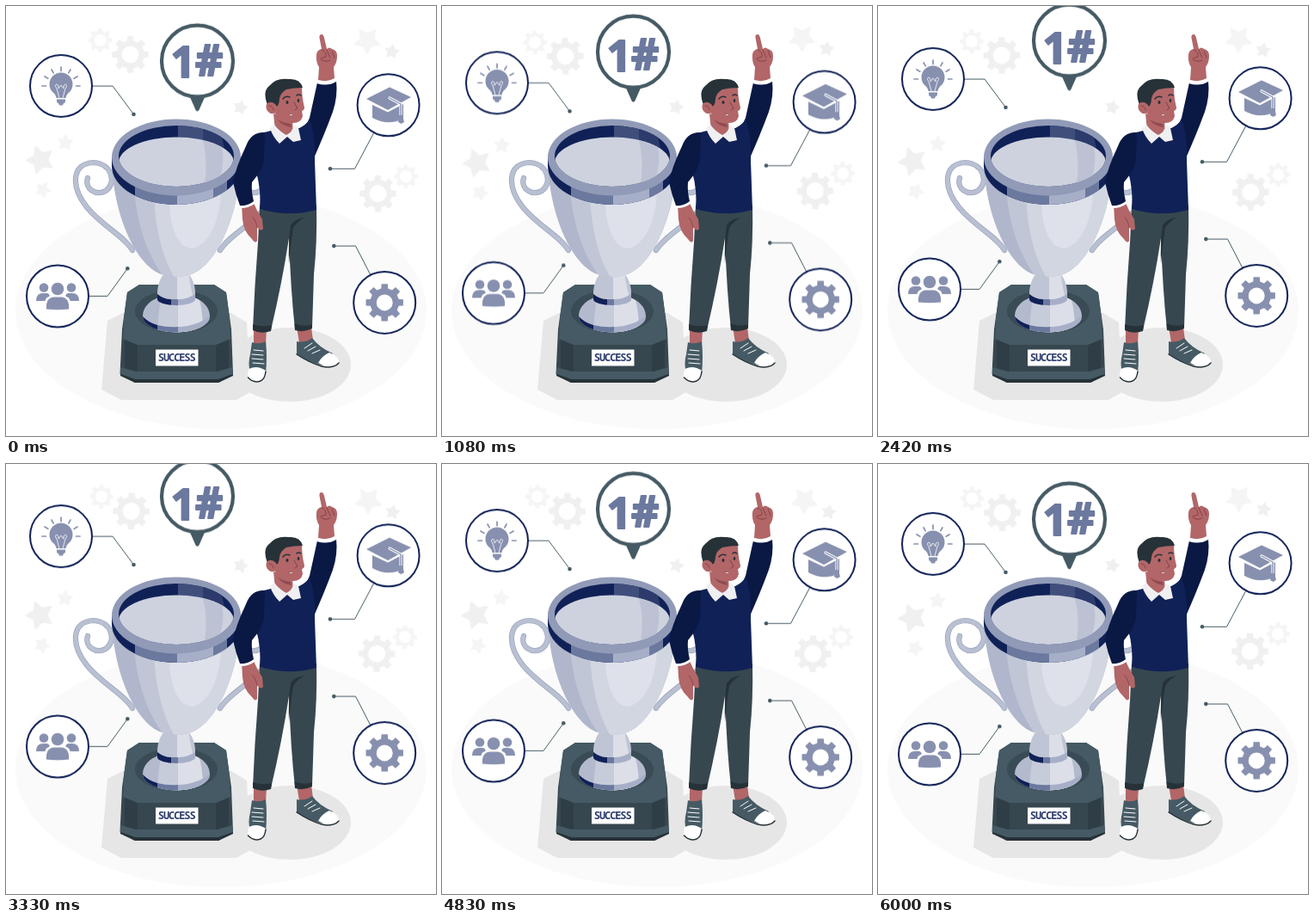
Recreate the animation shown at these times as an HTML page. Size 500 by 500 pixels, loop 6.04 s.

```html
<!DOCTYPE html>
<html lang="en">
<head>
<meta charset="utf-8">
<title>Success</title>
<style>
html, body { margin: 0; width: 100%; height: 100%; overflow: hidden; background: #fff; }
svg { display: block; width: 100vw; height: 100vh; }
.navy { fill: #102157; }
.deep { fill: #0a1844; }
.skin { fill: #b26668; }
.dark { fill: #263238; }
.slate { fill: #37474f; }
.steel { fill: #455a64; }
.icon { fill: #8790af; }
.ring { fill: #fff; stroke: #102157; stroke-width: 2; }
.lead { fill: none; stroke: #455a64; stroke-width: 1; }
.line { fill: none; stroke-linecap: round; stroke-linejoin: round; }
#scenery { transform-origin: 252px 132px; }
#near { fill: #f0f0f0; stroke: #f0f0f0; }
#far { fill: #f5f5f5; stroke: #f5f5f5; }
</style>
</head>
<body>
<svg viewBox="0 0 500 500">
  <defs>
    <clipPath id="cup"><path d="M123 178C124 242 151 302 181 312Q198 318 215 312C245 302 272 242 273 178Z"/></clipPath>
    <clipPath id="band"><path d="M123 176V186A75 45 0 0 0 273 186V176Z"/></clipPath>
    <clipPath id="inside"><ellipse cx="198" cy="174.5" rx="67" ry="35.5"/></clipPath>
    <clipPath id="foot"><path d="M159 361C159 350 167 343 177 339H219C229 343 237 350 237 361A39 18.5 0 0 1 159 361Z"/></clipPath>
    <clipPath id="stem"><path d="M184 311H212C218 318 220 327 220 334V341A22 7 0 0 1 176 341V334C176 327 178 318 184 311Z"/></clipPath>
    <path id="curl" class="line" d="M147 284C138 268 112 256 94 234C75 210 76 183 102 182C123 183 129 206 116 215C105 221 91 213 95 200"/>
  </defs>

  <ellipse cx="250" cy="354.4" rx="239" ry="137.8" fill="#fafafa"/>
  <g id="scenery"><g id="far"></g><g id="near"></g></g>

  <g fill="#e6e6e6">
    <path d="M118 366L136 357H262L280 368L284 449L268 458H134L111 446Z"/>
    <ellipse cx="330" cy="417" rx="71" ry="43"/>
  </g>

  <!-- trophy -->
  <g>
    <path class="slate" d="M141 333L155 324H242L256 333L262 376L264 428L247 438H150L132.500 428L135 376Z"/>
    <path class="steel" d="M155 324H242L256 333L260 364L243 391H154L137 364L141 333Z"/>
    <ellipse cx="198" cy="355" rx="48" ry="25" fill="#394b54"/>
    <path class="steel" d="M137 364L136 387L153 395H244L261 387L260 364L243 388H154Z"/>
    <path class="slate" d="M153 394H244L247 426H150Z"/>
    <path d="M138 388L153 394V425H138ZM259 388L244 394V425H259Z" fill="#2f3e46"/>
    <path class="steel" d="M133 420L151 425H246L263 420L264 428L247 434H150L133 428Z"/>
    <path class="dark" d="M133 428L150 434H247L264 428V430L247 438H150L133 430Z"/>
    <rect x="174" y="399.500" width="49.500" height="19" fill="#fff"/>
    <text x="198.200" y="413.300" text-anchor="middle" font-family="'Noto Sans Mono', monospace" font-weight="800" font-size="12" letter-spacing="-1.1" fill="#2b3a6b">SUCCESS</text>

    <g clip-path="url(#foot)">
      <rect x="155" y="335" width="90" height="50" fill="#b4bace"/>
      <path d="M181 335H220V390H176Q176 360 181 335Z" fill="#c7ccda"/>
      <path d="M200 335H222Q230 350 229 390H200Z" fill="#dcdfe8"/>
      <path class="navy" d="M155 356Q163 368 176 371V385H155Z"/>
      <path d="M176 371Q188 374 200 373V385H176Z" fill="#6c799f"/>
      <path d="M200 373Q226 372 240 357V385H200Z" fill="#a7afc8"/>
    </g>
    <g clip-path="url(#stem)">
      <rect x="170" y="305" width="60" height="50" fill="#c0c5d5"/>
      <path d="M199 305H212Q213 325 221 350H199Z" fill="#dcdfe8"/>
      <path class="navy" d="M170 329Q180 341 192 341V352H170Z"/>
      <path d="M192 341H200V352H192Z" fill="#6c799f"/>
      <path d="M200 341Q216 341 226 329V352H200Z" fill="#a7afc8"/>
    </g>

    <g id="handles"></g>

    <g clip-path="url(#cup)">
      <rect x="120" y="170" width="156" height="150" fill="#b0b6cb"/>
      <path d="M149 210C151 252 165 295 188 320H275V190Z" fill="#c1c6d6"/>
      <path d="M172 210C172 260 184 300 199 320H250L280 190Z" fill="#d2d6e1"/>
      <path d="M190 220C189 252 198 281 216 282C237 278 249 248 250 215Z" fill="#dee1ea"/>
    </g>
    <g clip-path="url(#band)" id="stripes"></g>
    <ellipse cx="198" cy="176" rx="75" ry="44.500" fill="#919bb8"/>
    <g clip-path="url(#inside)">
      <rect class="navy" x="130" y="135" width="136" height="80"/>
      <path d="M200 135H229V170H200Z" fill="#404e7c"/>
      <path d="M229 135H247L256 175H229Z" fill="#2c3b6c"/>
      <ellipse cx="198" cy="182" rx="67" ry="29.500" fill="#ced2df"/>
      <path d="M229 156L251 164Q255 182 248 201L231 206Q235 180 229 156Z" fill="#bcc2d3"/>
    </g>
  </g>

  <!-- man -->
  <g>
    <path class="skin" d="M288 375H303L302 394H288ZM338 373H355L357 389L341 392Z"/>
    <path class="steel" d="M286 391Q294 394 302 390Q304 408 302 427L284 426Q281 416 284 405Z"/>
    <path d="M282.500 422Q292 417 302 424Q302 434 297 436Q288 439 282 434Q280 428 282.500 422Z" fill="#fff"/>
    <path class="line" d="M281.500 432Q288 439 296 436Q301 434 302 425" stroke="#263238" stroke-width="1.500"/>
    <path class="steel" d="M338 390Q348 392 356 386Q364 397 380 404L368 418Q352 415 338 405Z"/>
    <path d="M363 415Q367 407 376 403Q388 408 387 415Q384 421 371 419Z" fill="#fff"/>
    <path class="line" d="M338 405Q353 415 367 419Q381 422 387 415" stroke="#263238" stroke-width="1.500"/>
    <path class="line" d="M288 400L299 401M286 405L299 406M286 410L299 411M287 415L300 416M347 398L356 392M351 401L360 396M356 404L365 400" stroke="#fff" stroke-width="1"/>

    <path class="slate" d="M295 232H361Q362 275 358 312Q357 345 356 374Q346 379 336 376Q331 330 329 270Q321 322 308 377Q297 381 287 376Q289 325 293 275Z"/>
    <path class="dark" d="M287 370Q298 374 309 371L308 378Q297 382 287 377ZM335.500 369Q346 374 356 370V375Q346 380 336 377ZM347 246Q336 247 331 255Q328 275 329 300Q331 276 334 258Q337 252 347 246Z"/>

    <path class="deep" d="M344 150L353 130L362 89Q374 94 384 87Q386 105 380 123Q370 150 357 179Z"/>
    <path d="M362.500 86Q374 90 383.500 84L384 88Q374 94 361.500 90Z" fill="#fff"/>
    <path class="skin" d="M363 86L364 71Q360 65 361 56Q362 51 367 50L364.500 37Q364 33 367 33Q369 33 370 37L373 50Q376 47 379 50Q385 51 385 58Q385 66 381 71L382 84Q374 89 363 86Z"/>
    <path class="line" d="M367 51Q373 53 372 59L366 61M373 51L377 60M379 52L382 60M366 62Q370 66 377 63" stroke="#7f4145" stroke-width=".9"/>

    <path class="navy" d="M289 150Q300 147 308 145L341 142Q349 138 353 132Q360 150 359 180L361 237Q330 246 295 236Q297 215 291 193Z"/>
    <path class="skin" d="M311 125L313 145Q323 157 334 149L333 132Z"/>
    <path d="M316 132Q322 136 331 137L332 141Q322 140 316 132Z" fill="#914b50"/>
    <path d="M307 142L312 138Q318 146 326 150Q333 147 335 138L340 142L343 156L334 158L327 152L318 160Q310 152 307 142Z" fill="#f0f0f3"/>

    <path class="skin" d="M274 230L287 227Q292 239 298 248L299 259Q296 263 292 257L292 273Q290 277 286 271Q276 262 275 248Z"/>
    <path class="line" d="M287 246Q291 250 292 258" stroke="#7f4145" stroke-width=".8"/>
    <path d="M272 230Q280 230 287 225L289 230Q282 235 274 235Z" fill="#fff"/>
    <path class="deep" d="M301 147Q285 146 279 163Q267 188 264 205Q267 219 272 232Q281 233 288 227Q285 215 286 205Q300 189 300 176Z"/>

    <path class="skin" d="M309 112Q311 96 325 93L344 93Q344 107 347 118Q347 121 344 122L345 128Q343 136 334 136Q319 136 313 125Z"/>
    <path class="dark" d="M304 115Q298 99 306 93Q314 83 329 85Q342 84 345 95Q335 95 326 97Q319 101 318 108Q318 112 316 116L311 117Z"/>
    <path class="skin" d="M314 115Q308 109 303 114Q301 120 306 124Q310 127 315 123Z"/>
    <path class="line" d="M306 116Q310 116 311 121" stroke="#7f4145" stroke-width=".9"/>
    <path class="line" d="M322 108Q325 104 330 106M338 104Q340 102 343 104" stroke="#263238" stroke-width="1.500"/>
    <ellipse class="dark" cx="327" cy="112" rx="1.500" ry="2"/>
    <ellipse class="dark" cx="340" cy="110" rx="1.300" ry="1.900"/>
    <path class="line" d="M335 112Q337 116 339 119L336 121" stroke="#7f4145" stroke-width="1"/>
    <path d="M329 125Q331 126.500 334 125.500Q333 128 330.500 127.500Z" fill="#fff" stroke="#7f4145" stroke-width=".5"/>
  </g>

  <!-- badges -->
  <g class="float">
    <path class="lead" d="M100 93.100H124L148.500 126"/><circle class="steel" cx="148.500" cy="126" r="2.300"/>
    <circle class="ring" cx="64" cy="93.100" r="36"/>
    <path class="icon" d="M58.500 107Q58 103 54 100A13.500 13.500 0 1 1 74 100Q70 103 69.500 107ZM59 108.500H69V111Q69 113 67 113L66 115.500H62L61 113Q59 113 59 111Z"/>
    <path class="line" d="M62 107L59 96Q56 92 59 91Q62 92 61 96L64 92L67 96Q66 92 69 91Q72 92 69 96L66 107" stroke="#fff" stroke-width=".8"/>
    <path id="rays" class="line" stroke="#8790af" stroke-width="1.700"/>
  </g>
  <g class="float">
    <path class="lead" d="M428 147L405.500 189.300H377"/><circle class="steel" cx="377" cy="189.300" r="2.300"/>
    <circle class="ring" cx="444.600" cy="115.300" r="36"/>
    <path class="icon" d="M419 108L446 94.500L471 106L444 121ZM426 115L444 123.500L462 114V131Q444 140 426 130Z"/>
    <path class="line" d="M446 107L459 114V132" stroke="#fff" stroke-width="3.200"/>
    <path class="line" d="M446 107L459 114V128" stroke="#8790af" stroke-width="1.400"/>
    <path class="icon" d="M457 127H461L463 135L459.500 137L456 135Z"/>
  </g>
  <g class="float">
    <path class="lead" d="M96 337.400H118L141.300 305.300"/><circle class="steel" cx="141.300" cy="305.300" r="2.300"/>
    <circle class="ring" cx="60" cy="337.500" r="36"/>
    <g class="icon">
      <circle cx="44" cy="327.500" r="5.300"/><circle cx="76" cy="327.500" r="5.300"/>
      <path d="M35 343Q35 334 43 334H48Q52 336 50 338Q46 339 45.500 343ZM85 343Q85 334 77 334H72Q68 336 70 338Q74 339 74.500 343Z"/>
      <circle cx="60" cy="329" r="7.300"/>
      <path d="M47 352.500Q46 339 56 338.500H64Q74 339 73 352.500Q60 354 47 352.500Z"/>
    </g>
  </g>
  <g class="float">
    <path class="lead" d="M424 313L406.500 279.100H381.300"/><circle class="steel" cx="381.300" cy="279.100" r="2.300"/>
    <circle class="ring" cx="440.200" cy="344.900" r="36"/>
    <g id="cog" class="icon"></g>
  </g>

  <g id="pin">
    <path class="steel" d="M213 104H232L224.500 121Q222.500 124 220.500 121Z"/>
    <circle cx="222.500" cy="64.200" r="41.500" fill="#fff" stroke="#455a64" stroke-width="4.200"/>
  </g>
  <text id="rank" x="222" y="82.800" text-anchor="middle" font-family="'Open Sans', 'Noto Sans', sans-serif" font-weight="700" font-size="50" fill="#6c799f" stroke="#6c799f" stroke-width="2" stroke-linejoin="round">1<tspan dy="-2">#</tspan></text>
</svg>
<script>
const LOOP = 6040, LEAD = 20;
const $ = id => document.getElementById(id);
const polar = (x, y, r, deg) => {
  const a = deg * Math.PI / 180;
  return (x + r * Math.cos(a)).toFixed(2) + ' ' + (y + r * Math.sin(a)).toFixed(2);
};
function add(parent, tag, attrs) {
  const el = document.createElementNS('http://www.w3.org/2000/svg', tag);
  for (const key in attrs) el.setAttribute(key, attrs[key]);
  parent.append(el);
}

function gear(parent, x, y, r, hole) {
  const points = [];
  for (let mid = 0; mid < 360; mid += 45) {
    for (const [k, off] of [[.77, -13.5], [1, -9.5], [1, 9.5], [.77, 13.5]])
      points.push(polar(x, y, r * k, mid + off));
  }
  const ring = `M${x - hole} ${y}a${hole} ${hole} 0 1 0 ${2 * hole} 0a${hole} ${hole} 0 1 0 ${-2 * hole} 0Z`;
  add(parent, 'path', { d: `M${points.join('L')}Z${ring}`, 'fill-rule': 'evenodd', 'stroke-width': 0 });
}

function star(parent, x, y, r, turn) {
  const points = Array.from({ length: 10 }, (_, i) =>
    polar(x, y, i % 2 ? r * .52 : r, turn + i * 36));
  add(parent, 'path', { d: `M${points.join('L')}Z`, 'stroke-width': 1.5, 'stroke-linejoin': 'round' });
}

gear($('near'), 144.5, 56.5, 21.5, 10);
gear($('near'), 432.5, 218, 21.5, 10);
gear($('far'), 109.5, 40, 14, 7);
gear($('far'), 465, 198, 14, 7);
star($('near'), 40, 179, 16.5, -38);
star($('near'), 272.5, 118, 8, -75);
star($('near'), 448.5, 53, 8, -80);
star($('far'), 69, 159, 9, -85);
star($('far'), 43, 214, 9, -65);
star($('far'), 420, 40, 15.5, -53);
gear($('cog'), 440.2, 344.9, 22, 9.5);

let rays = '';
for (let a = 180; a <= 360; a += 30) rays += `M${polar(64, 93, 17.5, a)}L${polar(64, 93, 22, a)}`;
$('rays').setAttribute('d', rays);

for (const side of ['', 'translate(396 0) scale(-1 1)'])
  for (const [stroke, width] of [['#99a2bd', 6.2], ['#b9c0d2', 4.8]])
    add($('handles'), 'use', { href: '#curl', transform: side, stroke, 'stroke-width': width });

[[120, '#102157'], [150, '#6c799f'], [199, '#a7afc8'], [241, '#6c799f'], [257, '#102157']]
  .forEach(([x, fill]) => add($('stripes'), 'rect', { x, y: 170, width: 280 - x, height: 70, fill }));

function loop(el, frames, duration) {
  el.animate(frames, { duration, iterations: Infinity, iterationStart: LEAD / duration });
}
const rise = h => ['0px', `${-h}px`, '0px'].map(y => ({ transform: `translateY(${y})` }));

document.querySelectorAll('.float').forEach(el => loop(el, rise(10), LOOP));
loop($('pin'), rise(30), LOOP);
loop($('rank'), rise(20), LOOP);
loop($('scenery'), [[0, 0], [.25, 1], [.75, -1], [1, 0]]
  .map(([offset, deg]) => ({ offset, transform: `rotate(${deg}deg)` })), LOOP / 4);
</script>
</body>
</html>
```
